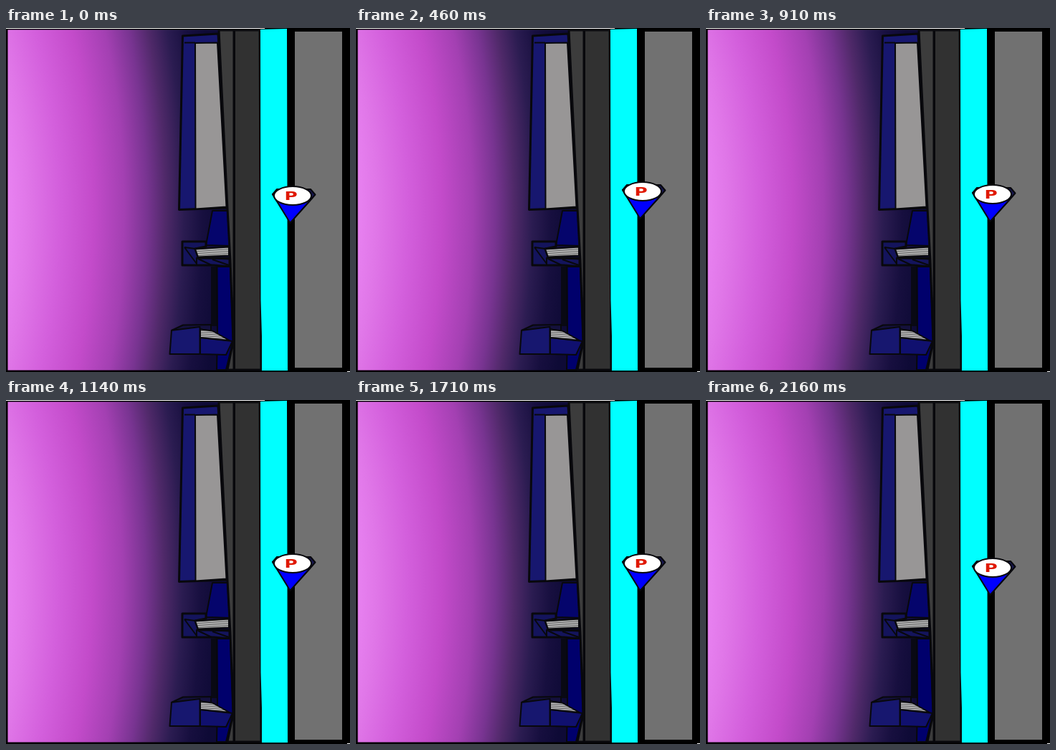
An HTML page that plays this animation: 480 by 480 pixels, repeating every 2180 ms.

```html
<!DOCTYPE html>
<html lang="en">
<head>
<meta charset="utf-8">
<title>Parking marker</title>
<style>
  html, body { margin: 0; width: 100%; height: 100%; overflow: hidden; background: #000; }
  svg { display: block; width: 100%; height: 100%; }
  .ink { stroke: #08080c; stroke-width: 3; stroke-linejoin: round; }
  .fine { stroke: #08080c; stroke-width: 2; stroke-linejoin: round; }
  text { font: bold 16px "DejaVu Sans", sans-serif; fill: #e01800; text-anchor: middle; }
</style>
</head>
<body>
<svg viewBox="0 0 480 480">
  <defs>
    <radialGradient id="glow" gradientUnits="userSpaceOnUse" cx="-300" cy="0" r="600"></radialGradient>
    <pattern id="hatch" width="4" height="3" patternUnits="userSpaceOnUse" patternTransform="rotate(-4)">
      <rect width="4" height="3" fill="#b0b0b0"/>
      <path d="M0 2.5H4" stroke="#666"/>
    </pattern>
  </defs>

  <rect width="480" height="480"/>
  <rect x="2.5" y="2.5" width="316" height="475" fill="url(#glow)"/>

  <!-- window -->
  <path class="ink" fill="#17176f" d="M246.500 11L296 8L309 251L241.500 253.500Z"/>
  <path class="fine" fill="none" d="M249 20.500H264"/>
  <path class="fine" fill="#989696" d="M264 21L295 20.500L307.500 249.500L264.500 252.500Z"/>

  <!-- upper ledge -->
  <path class="fine" fill="#05056c" d="M288 255H309L312 304L279 303Z"/>
  <path class="ink" fill="#14145c" d="M246 298H279V305L264 308L268 320L312 322V333L290 331H246Z"/>
  <path class="fine" fill="none" d="M249 306L266 329M264 308L249 306M266 320V330M268 322L287 331M288 323L311 331"/>
  <path class="fine" fill="url(#hatch)" d="M264 308.500L311 305.500V317.500L268 319.500Z"/>
  <path class="ink" fill="none" d="M266 321H312"/>

  <!-- column and lower ledge -->
  <path fill="#090914" d="M286 333H295V416H286Z"/>
  <path class="fine" fill="#00006c" d="M294.500 333H313L317 436L307 477H294L295 430Z"/>
  <path class="fine" fill="#14103c" d="M247 414.500L286 414V423L270 420L231 422Z"/>
  <path class="fine" fill="#17176f" d="M231 422L270.500 417V455H228.500Z"/>
  <path class="fine" fill="#10106f" d="M271 432L316 437L307 456L271 455Z"/>
  <path class="fine" fill="url(#hatch)" d="M271 420.500L288 422.500L312 436L271 432Z"/>

  <!-- wall and road -->
  <path class="ink" fill="#3c3c3c" d="M297 3H318V477H309L317 437L313 325L309 252Z"/>
  <path class="ink" fill="#313131" d="M318.500 3H354L356 477H318.500Z"/>
  <path fill="#0ff" d="M355 2L392 1L393 478H357V430L355.500 380Z"/>
  <rect x="403" y="5" width="66" height="469" fill="#717171"/>
  <path fill="#fff" d="M0 0H361V1H0ZM476 479H480V480H476Z"/>

  <g id="marker">
    <path class="fine" fill="#15154c" d="M372 232L378 225L425 225L431.500 232.500L425 240L396.500 271Z"/>
    <path class="fine" fill="#00f" d="M372 232L378 242L424 241L396.500 272Z"/>
    <ellipse class="fine" cx="400" cy="234" rx="26" ry="13" fill="#fff"/>
    <text transform="translate(397.500 240) scale(1.550 1)">P</text>
  </g>
</svg>
<script>
  const LOOP = 2180;
  const STARTS = [0, 120, 230, 340, 460, 690, 800, 910, 930, 1030,
    1140, 1250, 1370, 1600, 1710, 1820, 1930, 2050, 2160];
  const POSES = 6, LIFT = 8, FADE = 3;
  const SKY = [[0, "#e983f2"], [30, "#e077e8"], [75, "#d35fdc"], [122, "#c34bca"],
    [165, "#a340b2"], [197, "#783491"], [223, "#4f2969"], [248, "#2b1c51"],
    [274, "#170f3f"], [300, "#0e0a36"]];

  const glow = document.getElementById("glow");
  const marker = document.getElementById("marker");

  for (const [x, color] of SKY) {
    const stop = document.createElementNS("http://www.w3.org/2000/svg", "stop");
    stop.setAttribute("offset", (x + 300) / 600);
    stop.setAttribute("stop-color", color);
    glow.append(stop);
  }

  // Each hold shows the next of six poses on a cosine bob.
  function draw(ms) {
    const t = ms % LOOP;
    const step = STARTS.filter(s => s <= t).length - 1;
    const level = (1 - Math.cos(2 * Math.PI * (step % POSES) / POSES)) / 2;
    marker.setAttribute("transform", `translate(0 ${-LIFT * level})`);
    glow.setAttribute("gradientTransform", `translate(${-FADE * level} 255) scale(1 1.6)`);
  }

  const begin = performance.now();
  function tick() {
    draw(performance.now() - begin);
    requestAnimationFrame(tick);
  }
  tick();
</script>
</body>
</html>
```
